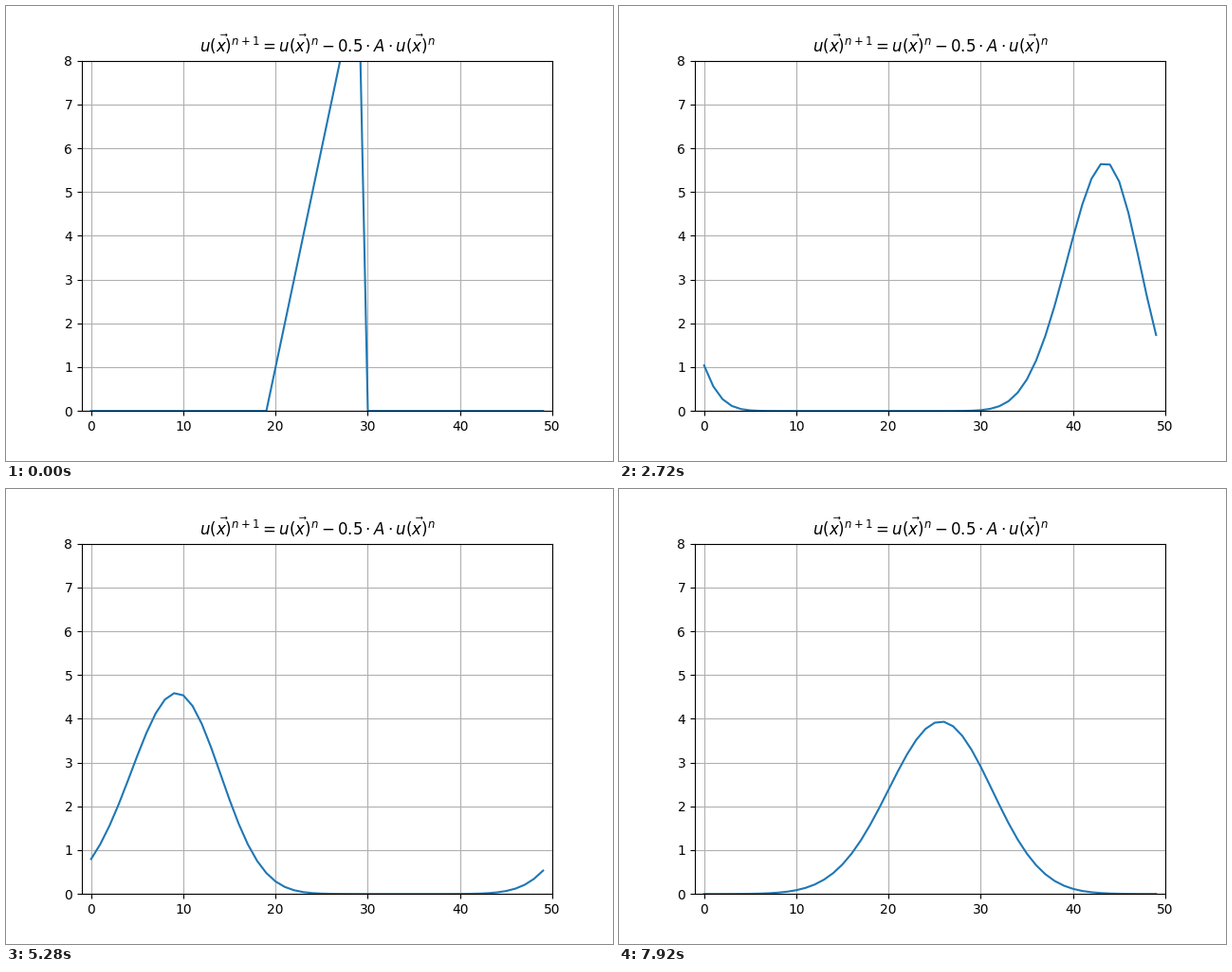
Animation of 640x480 px, one loop 8000 ms. Source, as a matplotlib script:

```python
import numpy as np
import matplotlib.pyplot as plt
from matplotlib.animation import FuncAnimation

CELLS = 50
COURANT = 0.5
FRAMES = 100


def solve_advection():
    """Upwind scheme on a periodic grid, starting from a ramp."""
    u = np.zeros(CELLS)
    u[20:30] = np.arange(1, 11)
    states = [u]
    for _ in range(FRAMES - 1):
        u = u - COURANT * (u - np.roll(u, 1))
        states.append(u)
    return states


states = solve_advection()

fig, ax = plt.subplots(figsize=(6.4, 4.8), dpi=100)
ax.set(xlim=(-1, CELLS), ylim=(0, 8))
ax.set_title(r"$u\vec{(x)}^{n+1} = u\vec{(x)}^{n} - 0.5 \cdot A \cdot u\vec{(x)}^{n}$")
ax.grid()
line, = ax.plot(np.arange(CELLS), states[0])


def update(frame):
    line.set_ydata(states[frame])
    return line,


anim = FuncAnimation(fig, update, frames=FRAMES, interval=80, repeat=True, repeat_delay=0)
plt.show()
```
